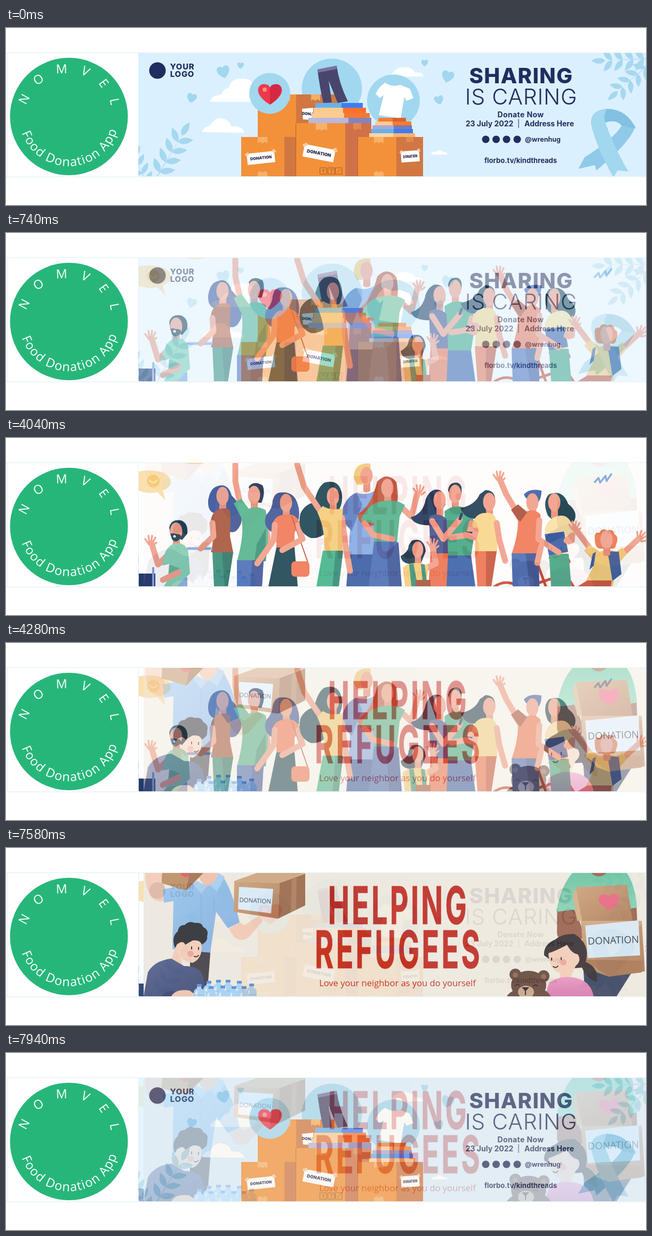
Write an HTML page without scripts that moves like this. It is 1200 px wide and 333 px high and loops after 8 s.

```html
<!DOCTYPE html>
<html lang="en">
<head>
<meta charset="utf-8">
<title>Donation banner</title>
<style>
html,body{margin:0;height:100%;overflow:hidden;background:#fff}
svg{display:block;width:100%;height:100%}
text{font-family:Inter,"Open Sans",sans-serif;text-anchor:middle}
.badge text{font:23.5px "Open Sans","Noto Sans",sans-serif;fill:#fff}
.navy{fill:#1f2e5e;font-weight:700;font-size:14px}
.tag{font:900 7.4px Inter,sans-serif;fill:#2b2a4c}
.pen{font-family:"Open Sans",sans-serif;fill:#3b3f4a}
.big{font:700 98px Inter,sans-serif;letter-spacing:8px;fill:#c02b20;stroke:#c02b20;stroke-width:1}
.arm path{fill:none;stroke:#f3a08b;stroke-width:11;stroke-linecap:round;stroke-linejoin:round}
.line{fill:none;stroke-linecap:round;stroke-linejoin:round}
/* each fade runs in 60 ms steps */
.crowd,.refuge,.again{opacity:0;animation:crowd 8s steps(10,start) -4ms infinite}
.refuge{animation-name:refuge}
.again{animation-name:again;animation-timing-function:steps(7,start)}
@keyframes crowd{0%,6.25%{opacity:0}13.75%,100%{opacity:1}}
@keyframes refuge{0%,50.5%{opacity:0}58%,100%{opacity:1}}
@keyframes again{0%,94.75%{opacity:0}100%{opacity:.7}}
</style>
</head>
<body>
<svg viewBox="0 0 1200 333" preserveAspectRatio="none">
<defs>
  <clipPath id="c1"><path d="M248 47h952v232H248z"/></clipPath>
  <clipPath id="c2"><path d="M249.500 47H1200v232H249.500z"/></clipPath>
  <clipPath id="c3"><path d="M258.500 47H1199v232H258.500z"/></clipPath>
  <linearGradient id="card" x2="1" y2="1"><stop stop-color="#cfa27a"/><stop offset="1" stop-color="#b07c56"/></linearGradient>
  <linearGradient id="blue" x2="1" y2="1"><stop stop-color="#9cc6ec"/><stop offset="1" stop-color="#7eabdc"/></linearGradient>
  <linearGradient id="dusk" x2="1" y2="1"><stop stop-color="#56608d"/><stop offset="1" stop-color="#3c466f"/></linearGradient>
  <linearGradient id="mint" x2="0" y2="1"><stop stop-color="#6cc39f"/><stop offset="1" stop-color="#8ed4b6"/></linearGradient>
  <linearGradient id="rose" x2="0" y2="1"><stop stop-color="#ea97c0"/><stop offset="1" stop-color="#d977aa"/></linearGradient>
  <path id="heart" d="M0 9C-14-1-9-10-4-9Q-1-9 0-6Q1-9 4-9C9-10 14-1 0 9Z"/>
  <path id="leaf" d="M0 0Q11-13 29 0Q11 11 0 0Z"/>
  <g id="pair"><use href="#leaf" transform="rotate(-38)"/><use href="#leaf" transform="rotate(-142)"/></g>
  <g id="sprig" fill="#a6d8ef">
    <path d="M-1 0L0-98L1 0z"/>
    <use href="#pair" y="-14"/><use href="#pair" y="-36"/><use href="#pair" y="-58"/><use href="#pair" y="-80"/>
    <use href="#leaf" transform="translate(0 -94) rotate(-90)"/>
  </g>
  <g id="face" fill="#f3a08b"><path d="M-6 8H7V29Q0 33-6 29z" fill="#e98f7b"/><ellipse rx="11.500" ry="17"/></g>
  <path id="hand" class="line" stroke="#f3a08b" stroke-width="3.500" d="M-3 3L-10-7M-2 0L-4-13M1 0L3-13M3 2L9-10M5 5L11 0"/>
  <g id="bottle"><path d="M-10 32V10Q-10 3-4 1V-3H4V1Q10 3 10 10V32z" fill="#a9cff0"/><path d="M-7 32V11Q-6 6-3 5V32z" fill="#d9edfa"/><path d="M-4-7H5V-2H-4z" fill="#5590d2"/><path d="M-9 14H9" stroke="#8dbce6" stroke-width="1.500"/></g>
  <g id="label"><path d="M-26-10H26V11H-26z" fill="#fff"/><path d="M-30-9L-23-13L-21-9L-27-5zM21-11L26-14L30-8L25-6z" fill="#f6c9a2"/><text class="tag" y="3">DONATION</text></g>

  <g id="share" clip-path="url(#c1)">
    <path d="M248 47h952v232H248z" fill="#dbf0fe"/>
    <path fill="#fff" d="M383 139Q384 127 402 126Q409 112 418 113Q421 94 443 95Q462 96 470 112Q490 110 494 139ZM368 196Q370 185 383 184Q390 168 405 170Q418 172 423 185Q443 184 447 197ZM700 92Q715 90 722 88Q731 72 752 74Q764 76 767 84Q781 82 783 91ZM796 238Q800 232 806 233Q812 226 819 233Q827 233 828 238Z"/>
    <use href="#sprig" transform="translate(281 283) rotate(31)"/>
    <use href="#sprig" transform="translate(268 300) rotate(-25) scale(.8)"/>
    <use href="#sprig" transform="translate(1208 58) rotate(-92) scale(.9)"/>
    <use href="#sprig" transform="translate(1208 66) rotate(-131) scale(.86)"/>
    <g fill="#a2d7f0">
      <use href="#heart" transform="translate(408 83) rotate(-14) scale(1.3)"/>
      <use href="#heart" transform="translate(440 71) scale(.66)"/>
      <use href="#heart" transform="translate(348 132) rotate(14)"/>
      <use href="#heart" transform="translate(785 66) scale(.7)"/>
      <use href="#heart" transform="translate(828 92) rotate(14) scale(1.25)"/>
      <use href="#heart" transform="translate(812 136) rotate(-14) scale(.95)"/>
      <circle cx="611" cy="114" r="56.500"/>
    </g>
    <path d="M472 125H570V210H472z" fill="#f2913a"/>
    <path d="M544 125H625V210H544z" fill="#d07742"/>
    <path d="M513 125h20v13l-5-3l-5 3l-5-3l-5 3zM572 125h17v12l-5-3l-4 3l-4-3l-4 3z" fill="#f6ad63"/>
    <path d="M441 205H522V279H441z" fill="#f2913a"/><path d="M522 205H545V279H522z" fill="#d07742"/>
    <path d="M660 205H732V279H660z" fill="#f2913a"/><path d="M732 205H782V279H732z" fill="#d07742"/>
    <path d="M543 179H636V279H543z" fill="#f2913a"/><path d="M636 179H685V205H660V279H636z" fill="#d07248"/>
    <path d="M472 205h18v12l-5-3l-4 3l-4-3l-5 3zM581 179h21v14l-5-3l-5 3l-5-3l-6 3zM690 205h18v12l-5-3l-4 3l-4-3l-5 3zM472 272l5-3l4 3l4-3l5 3v7h-18zM690 272l5-3l4 3l4-3l5 3v7h-18z" fill="#f8b167"/>
    <path d="M651 179h15v13l-5-3l-5 3l-5-3zM750 205h14v11l-5-3l-4 3l-5-3z" fill="#e08a55"/>
    <path d="M543 179H544V279H543zM659 205H660V279H659z" fill="#b9622f"/>
    <path d="M555 152L576 150V173L557 172z" fill="#fff"/><text class="tag" transform="translate(566 164) rotate(4)">DONA</text>
    <use href="#label" transform="translate(478 244) rotate(-6)"/>
    <use href="#label" transform="translate(587 235) rotate(11) scale(1.13)"/>
    <use href="#label" transform="translate(758 241) rotate(-4) scale(.66 1)"/>
    <path class="line" stroke="#a65d27" d="M589 263h12v12h-12zM604 263h12v12h-12zM618 263h12v12h-12zM595 272v-6m-2 2l2-2l2 2M607 266h6l-3 3v4M621 272l6-6"/>
    <path d="M584 78L620 71Q624 103 641 138L622 141L605 99L611 140L595 141Q588 111 584 78z" fill="#49466d"/><path d="M584 78L620 71L621 77L585 84z" fill="#7773a0"/>
    <path d="M580 141h50v9h-50z" fill="#69b1e9"/><path d="M629 141h40v9h-40z" fill="#3d7cf3"/>
    <path d="M577 150h55v10h-55zM573 160h63v9h-63z" fill="#fccb92"/><path d="M632 150h43v10h-43z" fill="#fa702d"/>
    <path d="M634 160h48v9h-48z" fill="#f47835"/><path d="M567 169h75v10h-75z" fill="#b9b7dc"/><path d="M642 169h43v10h-43z" fill="#8583bd"/>
    <circle cx="726.500" cy="137" r="49.500" fill="#a2d7f0"/>
    <path d="M711 103Q724 112 739 107L757 114L764 132L751 137L747 130L740 170L699 164L708 126L701 132L693 124Q699 110 711 103z" fill="#fff"/>
    <path d="M698 169h27v7h-27zM724 176h36v7h-36z" fill="#f57c31"/><path d="M725 169h25v7h-25z" fill="#da622b"/><path d="M692 176h33v7h-33z" fill="#fccb92"/>
    <path d="M687 183h40v7h-40z" fill="#aaa9d6"/><path d="M727 183h34v7h-34z" fill="#787bba"/>
    <path d="M685 190h42v8h-42z" fill="#69b1e9"/><path d="M727 190h36v8h-36z" fill="#3d7cf3"/><path d="M681 198h45v7h-45z" fill="#fcd6a8"/><path d="M726 198h41v7h-41z" fill="#f9b36e"/>
    <circle cx="494.500" cy="123" r="38.500" fill="#a2d7f0"/>
    <use href="#heart" transform="translate(495 125) scale(2.450 2.150)" fill="#ee394b"/>
    <path d="M495 112Q498 106 506 106C520 107 522 124 495 144z" fill="#d42843"/><circle cx="485" cy="116" r="4" fill="#f98b8b"/>
    <path d="M1156 181L1180 184Q1173 213 1107 268L1104 258L1073 265L1085 243Q1142 207 1156 181z" fill="#8fcbe8"/>
    <path d="M1097 179Q1098 154 1128 152Q1164 153 1181 189L1155 184Q1143 171 1124 178z" fill="#82c1e1"/>
    <path d="M1097 181Q1095 153 1127 153Q1118 166 1125 181Q1140 224 1167 270L1147 268L1139 281Q1107 225 1097 181z" fill="#a2d7f0"/>
    <circle cx="284" cy="80" r="15.500" fill="#1f2e5e"/>
    <g class="navy">
      <g font-size="15" font-weight="800" letter-spacing=".7"><text x="330.500" y="78">YOUR</text><text x="330.500" y="92">LOGO</text></g>
      <text x="966" y="104" font-size="40" font-weight="800" letter-spacing="1.300">SHARING</text>
      <text x="966" y="144" font-size="41" font-weight="300" letter-spacing=".8">IS CARING</text>
      <text x="965" y="168" letter-spacing=".4">Donate Now</text>
      <text x="906.500" y="185">23 July 2022</text><text x="961" y="185" font-weight="400">|</text><text x="1018.500" y="185">Address Here</text>
      <circle cx="899.500" cy="209.500" r="7"/><circle cx="919" cy="209.500" r="7"/><circle cx="938.500" cy="209.500" r="7"/><circle cx="958.500" cy="209.500" r="7"/>
      <text x="1006.500" y="214" font-size="12.500">@wrenhug</text>
      <text x="965" y="254" font-size="13">florbo.tv/kindthreads</text>
    </g>
  </g>
</defs>

<path d="M0 46.500H1200M0 280H1200M3 46V280" stroke="#e8f3f6" stroke-width="1.500"/>
<g class="badge">
  <circle cx="118" cy="166.500" r="110.500" fill="#27b67a"/>
  <path id="up" fill="none" d="M37 166A81 81 0 0 1 199 166"/><path id="down" fill="none" d="M24 166A94 94 0 0 0 212 166"/>
  <text letter-spacing="23.500"><textPath href="#up" startOffset="54.500%">NOMVEL</textPath></text>
  <text letter-spacing="1.400"><textPath href="#down" startOffset="51%">Food Donation App</textPath></text>
</g>

<use href="#share"/>

<g class="crowd" clip-path="url(#c2)">
  <path d="M249 47h951v232H249z" fill="#fff"/>
  <path d="M249 63Q273 58 294 65Q312 72 308 88Q303 96 294 98L299 118L284 102Q265 106 249 99zM334 47h40q-18 4-40 0z" fill="#fbe0ad"/>
  <circle cx="276" cy="81" r="12" fill="#f6cc72"/><path class="line" stroke="#fff3d5" stroke-width="2" d="M269 79Q276 89 283 79"/>
  <path class="line" stroke="#86b0ea" stroke-width="3.500" d="M1104 83l7-8l3 9l10-13l2 10l9-13"/>

  <path d="M652 75Q652 45 683 48L684 56Q668 62 669 88L658 88z" fill="#f6cc7c"/><use href="#face" x="676" y="71"/>
  <path d="M627 152Q632 113 657 103Q675 109 690 100Q702 120 702 222H642L646 160z" fill="#86ace8"/><path d="M627 152Q632 113 657 103L668 125L648 175z" fill="#5b7fc4"/>
  <path d="M643 219H702V279H638z" fill="#3b5ea6"/>

  <path d="M395 91Q416 83 423 108Q446 130 441 160Q430 187 412 172L396 142Q378 142 379 118Q382 96 395 91z" fill="#41589a"/><use href="#face" x="406" y="109"/>
  <path d="M384 156Q386 138 402 133Q416 130 421 138L420 185L426 215H384Q392 190 384 156z" fill="#a9573f"/><path d="M387 215H426L416 279H390z" fill="#3a8e7b"/><path d="M405 215H426L416 279H410z" fill="#2f7668"/>

  <g class="arm"><path d="M430 50L430 82L438 118"/><path d="M487 155L491 195L473 234"/></g>
  <path d="M455 92Q464 79 481 89Q487 103 479 122L464 120z" fill="#20324f"/><use href="#face" x="465" y="107"/>
  <path d="M427 123L441 114L455 133Q470 126 487 136Q495 180 487 232H433Q448 180 441 150z" fill="#56b590"/><path d="M470 200L487 170V232H466z" fill="#3d947a"/><path d="M433 230H483L480 279H433z" fill="#4d70b8"/><path d="M462 230H483L480 279H458z" fill="#41599d"/>

  <path d="M511 103Q540 98 547 125Q555 150 540 173L500 178Q480 167 488 145Q500 132 500 118Q503 105 511 103z" fill="#41589a"/><use href="#face" x="525" y="122"/>
  <path d="M501 158Q507 143 528 144Q544 142 552 162L541 178V207H507V178z" fill="#f27a58"/><path d="M507 206H541L547 279H492z" fill="#1d4655"/>
  <path class="line" stroke="#c4573f" stroke-width="2" d="M536 148L566 234"/><rect x="535" y="232" width="34" height="29" rx="7" fill="#f27a58"/>
  <g class="arm"><path d="M504 163L502 192L471 236"/><path d="M548 164L556 190L518 211"/></g>

  <path d="M597 84Q626 76 630 107Q632 130 618 142Q604 192 571 188Q544 176 552 142Q560 125 578 121Q584 92 597 84z" fill="#1c4655"/><use href="#face" x="613" y="110"/>
  <g class="arm"><path d="M546 50L559 92L591 140"/><path d="M630 150L637 205L645 250"/></g>
  <path d="M584 140L594 128Q610 138 632 132Q627 170 632 213H596Q600 176 584 140z" fill="#f7cf7c"/><path d="M594 212H632L624 279H582z" fill="#45b58e"/><path d="M618 212H632L624 279H612z" fill="#358d78"/>

  <path d="M696 82Q715 62 732 83Q739 120 728 132L690 165Q658 166 660 143Q684 130 696 82z" fill="#c15a42"/><use href="#face" x="715" y="94"/>
  <g class="arm"><path d="M741 130L760 148L771 106"/></g><use href="#hand" x="774" y="102"/>
  <path d="M664 157Q678 122 706 119Q730 114 748 126L738 148L733 198H690V160z" fill="#54b48f"/><path d="M690 195H734L742 279H680z" fill="#4d70b8"/><path d="M714 215L736 196L742 279H718z" fill="#3f599c"/>
  <g class="arm"><path d="M672 160L688 182L724 190"/></g>

  <path d="M804 97Q825 95 824 125L800 164Q765 166 759 149Q782 143 787 115Q793 100 804 97z" fill="#20385c"/><use href="#face" x="813" y="117"/>
  <path d="M829 99Q830 83 846 84Q858 88 853 108L834 112z" fill="#1c4655"/><use href="#face" x="842" y="105"/>
  <path d="M822 138Q845 120 872 137L880 168L872 222H828z" fill="#43a987"/><path d="M828 221H872L880 279H825z" fill="#3c63ab"/>
  <path d="M793 148Q810 138 826 152L829 218H796z" fill="#46568f"/><path d="M796 217H829L826 279H792z" fill="#ed7553"/>
  <g class="arm"><path d="M799 156L820 190L851 153"/><path d="M873 160L868 182L835 187"/></g>
  <path d="M848 153l5-13l4 2l-4 13zM862 176l24 1l-1 4l-23-1z" fill="#27375c"/>

  <path d="M899 98Q920 98 917 125L895 150Q862 158 852 132Q880 126 888 106z" fill="#203e56"/><use href="#face" x="906" y="120"/>
  <path d="M874 164Q880 140 900 141Q917 138 921 160V214H880V176z" fill="#fad88e"/><path d="M879 213H920L910 279H884z" fill="#ee7655"/><path d="M900 213H920L910 279H900z" fill="#c9583f"/>
  <g class="arm"><path d="M920 160L925 192L936 231"/><path d="M881 174L878 187L862 182"/></g>

  <path class="line" stroke="#c74e3a" stroke-width="5" d="M914 281Q936 264 962 279M985 277L1049 256L1037 224L1020 225M1037 224Q1054 222 1056 233M1049 256L1065 281M995 232L1012 279"/>
  <path d="M971 106Q982 94 1004 99Q1004 118 993 126L974 112z" fill="#3f60a8"/><use href="#face" x="987" y="121"/>
  <g class="arm"><path d="M926 78L938 106L957 138"/><path d="M1062 165L1061 193L1020 204"/></g><use href="#hand" x="924" y="76"/>
  <path d="M947 135L960 125L976 138Q992 132 1002 144L1004 182L998 218H948Q960 185 960 156z" fill="#f27a58"/><path d="M947 135L960 125L977 140L964 158z" fill="#aa513d"/><path d="M948 217H998L1000 279H950z" fill="#4d70b8"/><path d="M974 217H998L1000 279H982z" fill="#3f599c"/>

  <path d="M1018 106Q1044 96 1054 124Q1075 140 1064 159Q1035 166 1016 146Q1005 120 1018 106z" fill="#1c4655"/><use href="#face" x="1028" y="121"/>
  <path d="M1010 172Q1017 148 1040 146Q1060 144 1067 182L1053 186V219H1018z" fill="#fbe4a9"/><path d="M1018 218H1055L1060 279H1022z" fill="#45a785"/>
  <path d="M1010 181L1046 176L1054 214L1018 221z" fill="#3e61a9"/>
  <g class="arm"><path d="M1062 183L1051 193"/><path d="M1000 155L998 190L1036 215"/><path d="M1003 205L996 235"/></g>

  <g class="arm"><path d="M1096 209L1068 172"/><path d="M1158 216L1188 188"/></g><use href="#hand" x="1066" y="170"/><use href="#hand" transform="translate(1189 188) rotate(28)"/>
  <path d="M1084 212L1095 201L1113 214Q1130 208 1144 214L1156 206L1164 218L1143 243L1138 279H1082Q1096 254 1104 234z" fill="#f7cf7c"/><path d="M1128 213L1149 214L1154 256L1137 269zM1100 218L1106 214L1102 240L1094 248z" fill="#42619f"/><path d="M1072 279L1090 268H1136L1134 279z" fill="#c9573f"/>
  <path d="M1104 190Q1102 176 1113 178Q1117 168 1127 174Q1139 170 1141 181Q1150 186 1144 200Q1143 210 1134 208H1115Q1104 208 1104 190z" fill="#ee7a4e"/><use href="#face" x="1126" y="191"/>

  <path d="M761 193Q784 186 787 213L778 236Q742 242 740 222Q755 214 755 202z" fill="#1d3f55"/><use href="#face" transform="translate(772 210) scale(.9)"/>
  <g class="arm"><path d="M788 245L806 236L800 205"/></g><use href="#hand" x="800" y="203"/>
  <path d="M744 244Q758 232 780 236L792 240L788 279H748z" fill="#f7cf7c"/><path d="M756 238L764 236L772 279H760zM778 237L785 238L790 279H782z" fill="#3d947a"/><path d="M768 267h28v12h-28z" fill="#a9573f"/>

  <path d="M249 255H280V279H249z" fill="#24396b"/><path d="M274 243h4v36h-4zM310 262H340V279H310z" fill="#81a4e1"/>
  <path class="line" stroke="#86ace8" stroke-width="5" d="M341 208H385"/>
  <g class="arm"><path d="M387 160L389 185L365 208"/><path d="M309 215L285 238L273 198"/></g><use href="#hand" x="271" y="197"/>
  <path d="M306 168Q310 152 328 155Q342 160 340 180L330 192L308 180z" fill="#1d3f55"/><use href="#face" x="319" y="176"/><path d="M308 180Q314 178 319 181Q327 180 329 186Q319 201 311 190z" fill="#1d3f55"/><circle cx="316" cy="185" r="2.500" fill="#fff"/>
  <path d="M293 240Q296 204 317 198Q337 196 342 215L345 255L320 279H296L306 262L307 237z" fill="#86d0b4"/><path d="M306 238L326 245L304 262z" fill="#61b294"/>
  <g class="arm"><path d="M323 253L294 267"/></g>
</g>

<g class="refuge" clip-path="url(#c3)">
  <path d="M258 47h942v232H258z" fill="#f0e9dd"/>
  <path d="M345 185H384L377 279H345z" fill="#423c40"/>
  <path d="M262 47H294L300 98Q285 105 272 92Q258 66 262 47z" fill="#f6cbb4"/>
  <path d="M294 78L350 66L378 69L407 54Q425 82 438 140L416 151L394 120L383 197L312 190L314 100L296 103z" fill="url(#blue)"/>
  <path d="M358 47H398L393 60Q384 70 376 72Q364 64 358 47z" fill="#f2bfa5"/>
  <path d="M398 47L410 54L396 82L382 70Q394 62 398 47zM358 62L377 72L366 86L350 67z" fill="#a9cdee"/>
  <path class="line" stroke="#7aa5d2" d="M366 86V190M390 95V122"/>
  <path d="M293 47H370L338 80L292 66z" fill="#a5714d"/><path d="M293 47H344L338 80L292 66z" fill="#bf8d63"/><path d="M326 47H344V52Q335 60 326 47z" fill="#e05a60"/>
  <path d="M418 152L438 140L447 146L474 127L482 137L455 168Q440 178 428 168z" fill="#f6c9b1"/>
  <path d="M428 62L470 47H561L513 66z" fill="#cfa47b"/><path d="M428 62L513 66L510 133L427 120z" fill="url(#card)"/><path d="M513 66L561 48V108L510 133z" fill="#9c6846"/><path d="M536 57L545 54L544 116L534 121z" fill="#ad7b56"/>
  <path d="M437 73L501 77L497 123L435 115z" fill="#dcebf5"/><text class="pen" transform="translate(467 103) rotate(3)" font-size="11.500">DONATION</text>
  <path d="M316 186Q310 166 322 157Q324 144 335 145Q343 136 354 141Q367 139 370 149Q381 154 377 166Q379 176 366 182L340 200z" fill="#2d2c31"/>
  <path d="M320 182Q332 172 336 182L350 174Q366 172 367 184Q368 208 350 216Q336 214 328 206L330 222L308 216z" fill="#f6ccb5"/><circle cx="346" cy="199" r="6" fill="#f0a394"/><path class="line" stroke="#2d2c31" stroke-width="2" d="M348 186v4M361 187v4M353 204Q358 206 361 202"/>
  <path d="M258 279L266 234Q278 212 310 208L334 222Q362 222 369 240L376 268L352 279z" fill="url(#dusk)"/><path d="M291 279Q310 260 340 279z" fill="#37406a"/><path d="M310 279Q318 264 344 268L360 279z" fill="#f3c2ab"/>
  <use href="#bottle" x="380" y="257"/><use href="#bottle" x="398" y="255"/><use href="#bottle" x="416" y="255"/><use href="#bottle" x="437" y="257"/><use href="#bottle" x="460" y="262"/><use href="#bottle" x="362" y="263"/><use href="#bottle" x="384" y="267"/><use href="#bottle" x="406" y="266"/><use href="#bottle" x="427" y="267"/><use href="#bottle" x="446" y="267"/>

  <g class="big" transform="translate(736 0) scale(.547 1)"><text y="143">HELPING</text><text y="226">REFUGEES</text></g>
  <text x="734" y="260" style="font:16.500px 'Open Sans',sans-serif" fill="#c02b20">Love your neighbor as you do yourself</text>

  <path d="M1082 220H1182L1145 279H1086z" fill="#41455f"/>
  <path d="M1034 116L1066 112L1085 165L1070 180Q1035 180 1033 160z" fill="#9b614b"/><path d="M1168 105H1182L1184 150H1165z" fill="#9b614b"/>
  <path d="M1062 47H1164Q1180 70 1183 112L1160 116V130H1070L1066 116L1032 120Q1040 72 1062 47z" fill="url(#mint)"/><path d="M1097 47H1126Q1112 60 1097 47z" fill="#9b614b"/>
  <path d="M1068 74L1164 69L1175 137L1080 137z" fill="url(#card)"/><path d="M1068 74L1080 137H1071L1063 90z" fill="#d6ad86"/>
  <use href="#heart" transform="translate(1131 102) rotate(-4) scale(2.100 1.700)" fill="#ec6580"/>
  <path d="M1078 137H1192L1198 232L1130 242L1084 225z" fill="url(#card)"/><path d="M1078 137H1192L1190 147H1084z" fill="#d2a680"/><path d="M1084 210L1195 212L1192 234L1130 242z" fill="#ab7650"/>
  <path d="M1086 146L1186 136L1189 202L1091 207z" fill="#dbe8f2"/><text class="pen" transform="translate(1139 180) rotate(-2)" font-size="18.500">DONATION</text>
  <path d="M1066 162Q1045 160 1030 172Q1007 182 1009 202L1045 228L1080 225Q1090 248 1108 252Q1112 225 1087 214Q1096 180 1066 162z" fill="#3a3032"/>
  <path d="M1017 198Q1035 192 1052 182Q1060 198 1072 200Q1080 212 1068 222L1058 244H1038L1040 236Q1018 230 1017 198z" fill="#f6ccb5"/><circle cx="1045" cy="215" r="6" fill="#f0a394"/><path class="line" stroke="#322c30" stroke-width="2" d="M1041 206v4M1023 207v4M1026 223Q1031 227 1035 222"/>
  <path d="M1010 279L1018 254Q1036 240 1060 243Q1095 246 1102 279z" fill="url(#rose)"/>
  <g fill="#664739"><circle cx="955" cy="238" r="11"/><circle cx="1008" cy="241" r="11"/><ellipse cx="980" cy="258" rx="33" ry="27"/><path d="M939 279Q950 262 980 266Q1012 260 1021 279z"/></g>
  <circle cx="955" cy="239" r="5" fill="#8c6551"/><circle cx="1008" cy="242" r="5" fill="#8c6551"/><ellipse cx="975" cy="271" rx="15" ry="12" fill="#caa386"/><path d="M967 262h14l-7 8z" fill="#30272a"/><path class="line" stroke="#30272a" stroke-width="2" d="M955 259q4-5 8 0M989 260q4-5 8 0M974 269v7"/>
</g>

<use href="#share" class="again"/>
</svg>
</body>
</html>
```
